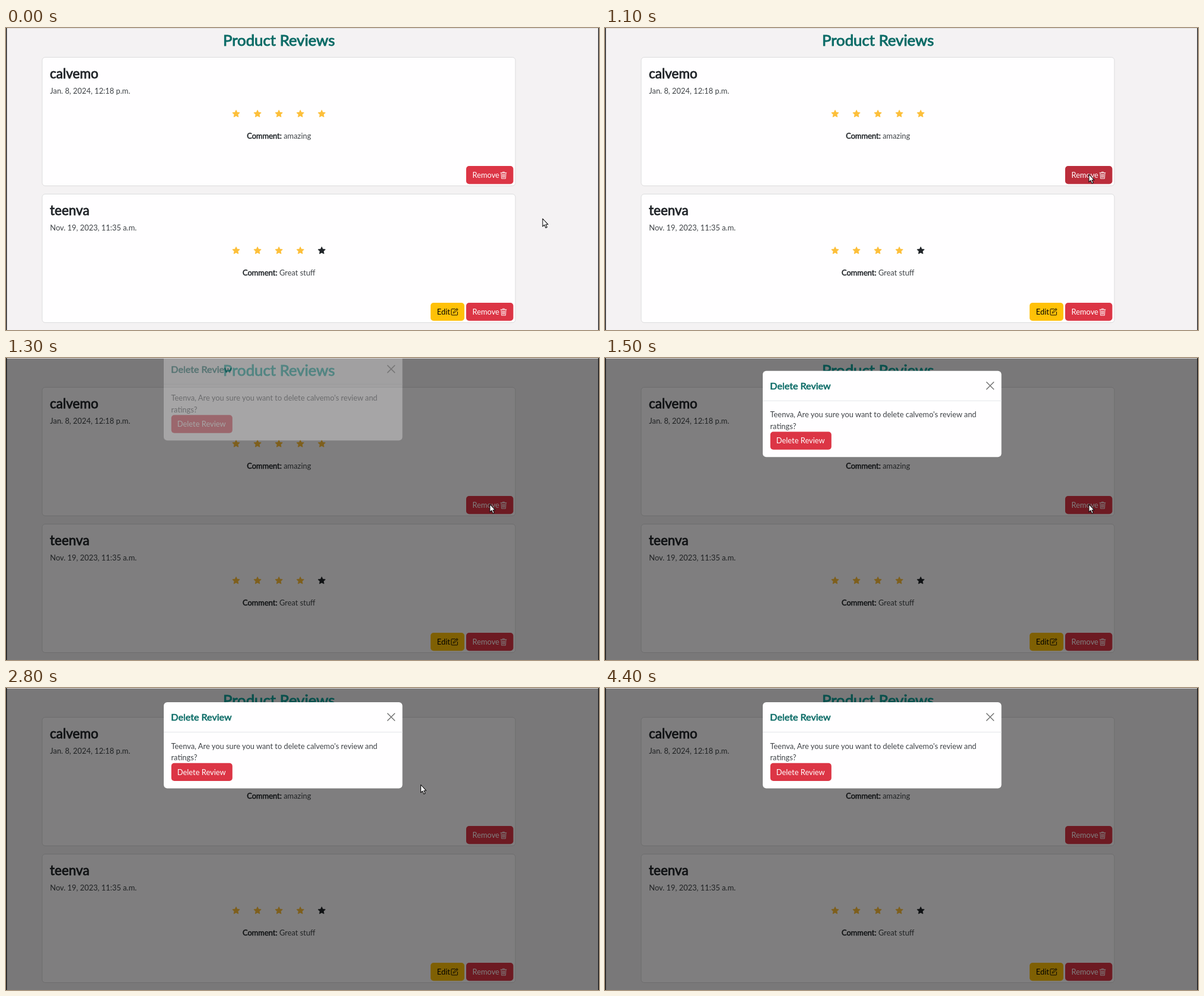
Animation, 1000 px wide and 510 px high, one loop 4900 ms. Source, as an HTML page:

```html
<!DOCTYPE html>
<html lang="en">
<head>
<meta charset="utf-8">
<title>Product Reviews</title>
<style>
  html, body { margin: 0; height: 100%; overflow: hidden; background: #f4f2f3; }
  svg { display: block; width: 100vw; height: 100vh; }
  text { font: 12.88px Lato, sans-serif; fill: #212529; white-space: pre; }
  .soft { fill: #3f4347; }
  .strong { stroke: #212529; stroke-width: .038em; }
  .name { font-size: 22.5px; }
  .teal { fill: #0a6b66; stroke: #0a6b66; }
  .white { fill: #fff; }
  .mid { text-anchor: middle; }
  .card { fill: #fffeff; stroke: #dcdcdd; }
  .red { fill: #dc3545; }
  .red.hover { fill: #bb2d3b; }
  .icon { fill: none; stroke-width: 1.15; stroke-linejoin: round; stroke-linecap: round; }
</style>
</head>
<body>
<svg viewBox="0 0 1000 510" preserveAspectRatio="none">
  <defs>
    <path id="trash" d="M2 3H14M6 3V1.5H10V3M3 3.5L3.8 15.3H12.2L13 3.5M5.7 5.5L6 13M8 5.5V13M10.3 5.5L10 13"/>
    <path id="pencil" d="M9 1.8H2.2Q1.3 1.8 1.3 2.7V13.8Q1.3 14.7 2.2 14.7H13.2Q14.2 14.7 14.2 13.8V8M13.3 1L15 2.7L7.8 9.9L5.4 10.6L6.1 8.2ZM11.8 2.5L13.5 4.2"/>
    <g id="remove">
      <rect x="776" y="233" width="79.5" height="30.5" rx="5"/>
      <text class="white" x="786.5" y="253">Remove</text>
      <use href="#trash" class="icon" stroke="#fff" transform="translate(832.6 242) scale(.805)"/>
    </g>
  </defs>

  <rect width="1000" height="510" fill="#f4f2f3"/>
  <g id="cards"></g>
  <use href="#remove" id="target" class="red"/>
  <use href="#remove" class="red" y="231"/>
  <rect x="716" y="464" width="57" height="30.5" rx="5" fill="#ffc107"/>
  <text x="726.8" y="484" style="fill:#000">Edit</text>
  <use href="#pencil" class="icon" stroke="#000" transform="translate(750 473) scale(.805)"/>
  <rect id="backdrop" width="1000" height="510" opacity="0"/>
  <text id="heading" class="strong teal mid" x="460.3" y="30" style="font-size:25.8px">Product Reviews</text>

  <g id="modal" opacity="0">
    <rect x="266" y="24" width="402.5" height="145.5" rx="6" fill="#fffeff"/>
    <path d="M266 74.5H668.5" stroke="#e3e5e8"/>
    <text class="strong teal" x="278.3" y="55" style="font-size:16.1px">Delete Review</text>
    <path d="M643.5 43L655.5 55M655.5 43L643.5 55" stroke="#777" stroke-width="1.6" stroke-linecap="round"/>
    <text class="soft" x="278.5" y="102.5">Teenva, Are you sure you want to delete calvemo's review and</text>
    <text class="soft" x="278.5" y="122">ratings?</text>
    <rect class="red" x="278.8" y="126.7" width="103" height="30.3" rx="5"/>
    <text class="white" x="288.8" y="146.5">Delete Review</text>
  </g>

  <path id="cursor" d="M0 0V13.2L3 10.5L5.2 15.6L7.4 14.6L5.2 9.7H9Z" fill="#fff" stroke="#111" stroke-width="1.1" stroke-linejoin="round"/>
  <path d="M0 .5H1000" stroke="#dddbdc"/>
  <path d="M.7 0V510M999.4 0V510" stroke="#111" stroke-width="1.4"/>
</svg>

<script>
const LOOP = 4900, STEP = 100;
const $ = id => document.getElementById(id);
const clamp = v => Math.min(1, Math.max(0, v));
const progress = (t, start, length) => clamp((t - start) / length);

const reviews = [
  { name: 'calvemo', date: 'Jan. 8, 2024, 12:18 p.m.', comment: 'amazing', rating: 5 },
  { name: 'teenva', date: 'Nov. 19, 2023, 11:35 a.m.', comment: 'Great stuff', rating: 4 },
];

const starPoints = Array.from({ length: 10 }, (_, i) => {
  const r = i % 2 ? 2.9 : 6.1, a = i * Math.PI / 5;
  return `${(r * Math.sin(a)).toFixed(2)},${(-r * Math.cos(a)).toFixed(2)}`;
}).join(' ');

const star = (x, y, color) =>
  `<polygon points="${starPoints}" transform="translate(${x} ${y})" fill="${color}" stroke="${color}" stroke-width="1.2" stroke-linejoin="round"/>`;

const stars = rating => Array.from({ length: 5 }, (_, i) =>
  star(388 + i * 36.1, 145, i < rating ? '#fdbf3a' : '#212529')).join('');

$('cards').innerHTML = reviews.map(({ name, date, comment, rating }, row) =>
  `<g transform="translate(0 ${row * 231})">
    <rect class="card" x="61" y="49.5" width="798" height="217" rx="5"/>
    <text class="strong name" x="74" y="85">${name}</text>
    <text class="soft" x="74.3" y="111">${date}</text>
    ${stars(rating)}
    <text class="soft mid" x="460.3" y="186.5"><tspan class="strong" fill="#212529">Comment:</tspan> ${comment}</text>
  </g>`).join('');

// Pointer stops: time, x, y
const stops = [[200, 905, 322], [1000, 816, 247], [1700, 816, 247], [2200, 779, 212], [3400, 620, 115]];

function pointerAt(t) {
  let [, x, y] = stops[0];
  for (let i = 1; i < stops.length; i++) {
    const [t0, x0, y0] = stops[i - 1], [t1, x1, y1] = stops[i];
    if (t < t0) break;
    const p = progress(t, t0, t1 - t0);
    x = x0 + (x1 - x0) * p;
    y = y0 + (y1 - y0) * p;
  }
  return [x, y];
}

function draw(now) {
  const t = Math.floor(now % LOOP / STEP) * STEP;
  const dim = progress(t, 1100, 150) / 2;
  const slide = (1 - progress(t, 1255, 300)) ** 1.7;
  const [x, y] = pointerAt(t);

  $('backdrop').setAttribute('opacity', dim);
  $('heading').style.filter = `brightness(${1 - dim * .5})`;
  $('modal').setAttribute('opacity', progress(t, 1255, 150));
  $('modal').setAttribute('transform', `translate(0 ${-40 * slide})`);
  $('cursor').setAttribute('transform', `translate(${x} ${y})`);
  $('cursor').setAttribute('visibility', t < 4000 ? 'visible' : 'hidden');
  $('target').classList.toggle('hover', t < 1200 && x < 855 && y < 263);
  requestAnimationFrame(draw);
}
requestAnimationFrame(draw);
</script>
</body>
</html>
```
